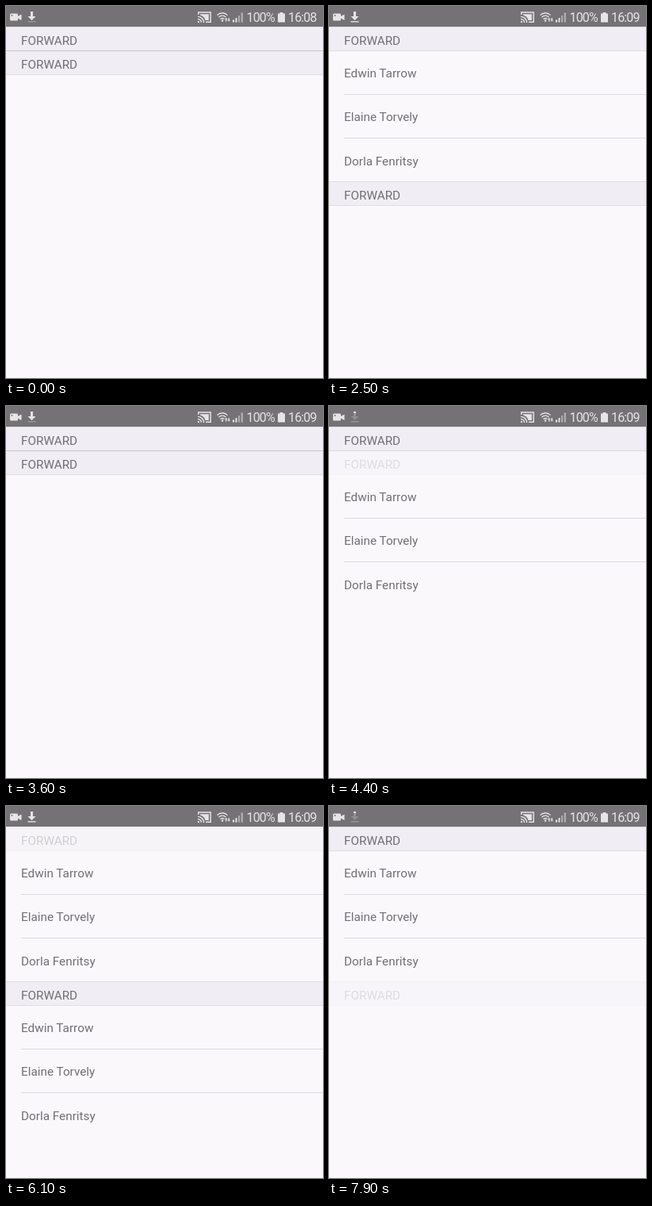
Animation of 400 by 469 pixels, one loop 8 s. Source, as an HTML page:

```html
<!DOCTYPE html>
<html lang="en">
<head>
<meta charset="utf-8">
<style>
  html, body { margin: 0; width: 100%; height: 100%; overflow: hidden; background: #faf8fb; }
  body { position: relative; font: 15.3px Roboto, sans-serif; color: #716f74; }
  #status { position: absolute; z-index: 1; left: 0; top: 0; display: block; }
  #status text { font-size: 16px; letter-spacing: -.85px; }
  #list { position: absolute; left: 0; right: 0; top: 27px; }
  .header, .row { box-sizing: border-box; padding-left: 19px; white-space: nowrap; }
  .header {
    position: relative; height: 31px; margin-top: -1px; line-height: 35px;
    background: #f0edf4 padding-box;
    border: solid rgba(0, 0, 0, .11); border-width: 1px 0;
  }
  .row { position: relative; height: 55px; line-height: 56px; }
  .row:last-child { line-height: 58px; }
  .row:not(:last-child)::after {
    content: ""; position: absolute; left: 19px; right: 0; bottom: 0;
    height: 1px; background: #dcdadf;
  }
</style>
</head>
<body>
<svg id="status" width="400" height="26" fill="#e6e4e6">
  <defs>
    <path id="arrow" d="M31 7h3v6h3.5l-5 5-5-5H31z"/>
    <clipPath id="wipe"><rect id="level" x="26" y="6" width="14" height="0"/></clipPath>
  </defs>
  <rect width="400" height="26" fill="#757275"/>

  <rect x="5" y="9.5" width="10" height="9" rx="1.5"/>
  <path d="M15 13l4.5-2.5v7.5L15 15.5z"/>
  <circle cx="7.5" cy="12" r="1" fill="#757275"/>

  <use href="#arrow" opacity=".25"/>
  <use href="#arrow" clip-path="url(#wipe)"/>
  <rect id="tray" x="27.5" y="19" width="10" height="1.5"/>

  <g transform="translate(241.2 4.9) scale(.77)">
    <path d="M5 7H19V17H13.4Q11.5 10.5 5 8.6zM1 18v3h3a3 3 0 0 0-3-3"/>
    <path d="M2 8V4H22V20H14M1 11a10 10 0 0 1 10 10M1 15a6 6 0 0 1 6 6"
      fill="none" stroke="#e6e4e6" stroke-width="1.9"/>
  </g>

  <path d="M266.5 11.5q6.500-5.500 13 0M268.500 14q4.500-3.800 9 0M270.500 16.500q2.500-2 5 0"
    fill="none" stroke="#e6e4e6" stroke-width="1.3"/>
  <circle cx="273" cy="18.500" r="1.200"/>
  <path d="M276 17l1.700-2.300 1.700 2.300h-1v2.500H277V17zM279.500 17.500h1V15h1.400v2.500h1l-1.700 2.300z"/>

  <path d="M286 17.500h2v3h-2zM289.500 15h2v5.500h-2z"/>
  <path d="M293 12h2v8.500h-2zM296.500 8.500h2.500v12h-2.500z" opacity=".5"/>

  <path d="M343 9.500h2.500V8h4v1.500h2.500v11h-9z"/>
  <text x="303.500" y="20">100%</text>
  <text id="clock" x="356" y="20"></text>
</svg>
<div id="list"></div>

<script>
const LOOP = 8000;
const NAMES = ["Edwin Tarrow", "Elaine Torvely", "Dorla Fenritsy"];
const TAPS = [
  { section: 0, press: 1000, release: 1140 },
  { section: 0, press: 2550, release: 2690 },
  { section: 1, press: 4200, release: 4395 },
  { section: 0, press: 5850, release: 6040 },
  { section: 1, press: 7700, release: 7895 }
];
const DIMMED = 0.2, FADE_OUT = 150, FADE_IN = 250;

const byId = id => document.getElementById(id);

function addElement(parent, className, text = "") {
  const element = document.createElement("div");
  element.className = className;
  element.textContent = text;
  return parent.appendChild(element);
}

const sections = [0, 1].map(() => {
  const header = addElement(byId("list"), "header", "FORWARD");
  const rows = addElement(byId("list"), "rows");
  NAMES.forEach(name => addElement(rows, "row", name));
  return { header, rows };
});

function ease(x) {
  const p = Math.min(1, Math.max(0, x));
  return p < 0.5 ? 2 * p * p : 1 - 2 * (1 - p) ** 2;
}

function headerOpacity(taps, time) {
  const tap = taps.filter(({ press }) => press <= time).pop();
  if (!tap) return 1;
  const fade = time < tap.release
    ? 1 - ease((time - tap.press) / FADE_OUT)
    : ease((time - tap.release) / FADE_IN);
  return DIMMED + (1 - DIMMED) * fade;
}

// The download arrow fills from the top, then its tray lights up.
function drawDownload(time) {
  const step = Math.floor(((time + 1100) % 1200) / 200);
  byId("level").setAttribute("height", [13, 13, 3, 3, 8, 13][step]);
  byId("tray").setAttribute("opacity", step < 2 ? 0.9 : 0.3);
}

function render(time) {
  sections.forEach(({ header, rows }, index) => {
    const taps = TAPS.filter(({ section }) => section === index);
    const toggles = taps.filter(({ release }) => release <= time).length;
    rows.hidden = toggles % 2 === 0;
    header.style.opacity = headerOpacity(taps, time);
  });
  byId("clock").textContent = time < 600 ? "16:08" : "16:09";
  drawDownload(time);
}

const start = performance.now();
function frame() {
  render((performance.now() - start) % LOOP);
  requestAnimationFrame(frame);
}
frame();
</script>
</body>
</html>
```
